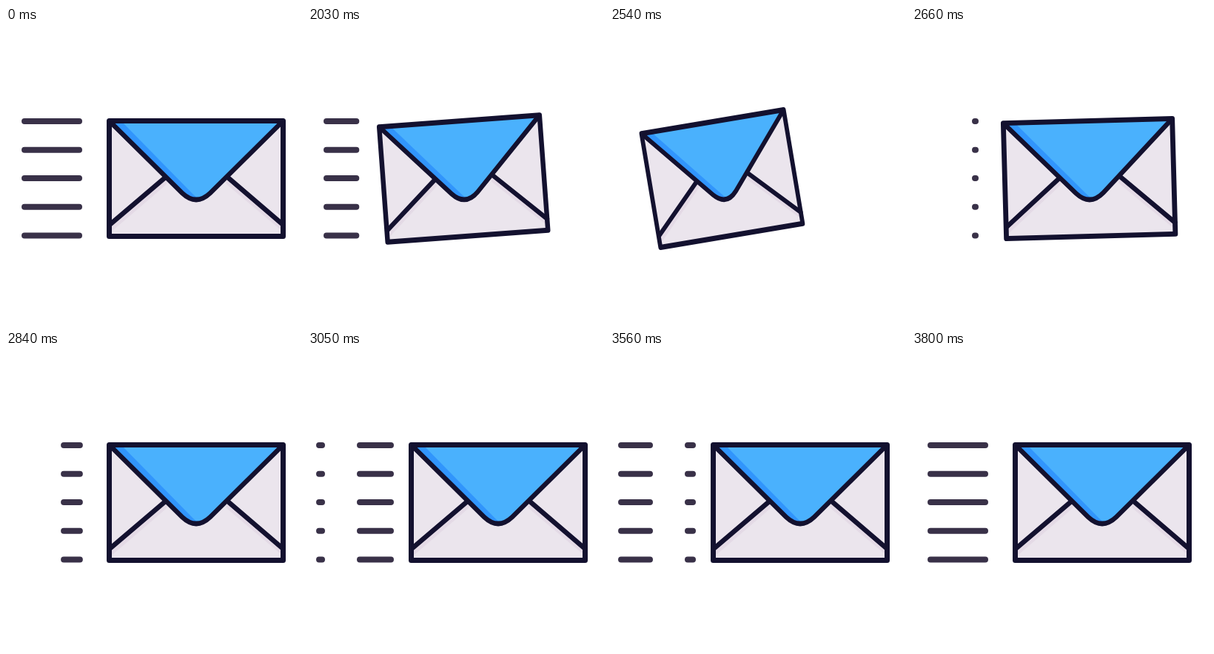
An HTML page for the animation above (3830 ms loop, 400 px wide and 400 px high).

```html
<!DOCTYPE html>
<html lang="en">
<head>
<meta charset="utf-8">
<title>Sending mail</title>
<style>
  html, body { margin: 0; height: 100%; overflow: hidden; background: #fff; }
  svg { display: block; width: 100%; height: 100%; }
</style>
</head>
<body>
<svg viewBox="0 0 400 400" fill="none" stroke-linecap="round" stroke-linejoin="round">
  <path id="trails" stroke="#393148" stroke-width="8"/>
  <g id="mail" stroke="#13112f" stroke-width="7">
    <path fill="#ebe5ed" stroke="none" d="M139.5 125.5h235v156h-235z"/>
    <path stroke="#e4dae6" d="M214 209L143 270M301 209L371 268"/>
    <path stroke-width="6.5" d="M214 203L140 266M301 203L374.5 266"/>
    <path fill="#3195fc" stroke="none" d="M140 126L238 223Q257 241 276 223L374 126z"/>
    <path fill="#4ab1fd" stroke="none" d="M156 126L253 225Q258 230 263 231Q270 229 276 223L374 126z"/>
    <path stroke-width="6.5" d="M140 126L238 223Q257 241 276 223L374 126"/>
    <path d="M139.5 125.5h235v156h-235z"/>
  </g>
</svg>
<script>
const LOOP = 3830, PAUSE = 2000, STEP = 30;
const LEFT = 15, RIGHT = 112, SPAN = RIGHT - LEFT;
const ROWS = [126, 164.7, 203, 241.8, 280.4];
const RELEASE = 17.85;
// Step, start and end of the travelling dash; it wraps from RIGHT to LEFT.
const DASH = [[22, 85, 86], [35, 70, 116], [52, 105, 151], [60, 122, 196]];
const mail = document.getElementById('mail');
const trails = document.getElementById('trails');

// Fast pull back, then a quick release to rest.
function pull(n) {
  return n < RELEASE
    ? 1 - (1 - Math.min(1, n / 6)) ** 3
    : Math.max(0, 1 - (n - RELEASE) / 9) ** 3;
}

function dashAt(n) {
  const i = DASH.findIndex(key => n <= key[0]) || 1;
  const [a, b] = [DASH[i - 1], DASH[i]];
  const k = (n - a[0]) / (b[0] - a[0]);
  return [1, 2].map(j => a[j] + (b[j] - a[j]) * k);
}

function segments(n, p) {
  if (n < RELEASE) return [[25, 99 - 80 * p]];
  if (n < DASH[0][0]) return [];
  const [start, end] = dashAt(n);
  return [0, SPAN].map(shift =>
    [Math.max(LEFT, start - shift), Math.min(RIGHT, end - shift)]);
}

function draw(now) {
  const n = Math.max(0, Math.floor((now % LOOP - PAUSE) / STEP));
  const p = pull(n);
  mail.setAttribute('transform',
    `translate(${257 - 111 * p} 203.5) rotate(${-10 * p}) scale(${1 - 0.18 * p} 1) translate(-257 -203.5)`);
  trails.setAttribute('d', segments(n, p)
    .filter(([a, b]) => b > a)
    .flatMap(([a, b]) => ROWS.map(y => `M${a} ${y}H${b}`))
    .join(''));
}

const began = performance.now();
function tick() {
  draw(performance.now() - began);
  requestAnimationFrame(tick);
}
tick();
</script>
</body>
</html>
```
